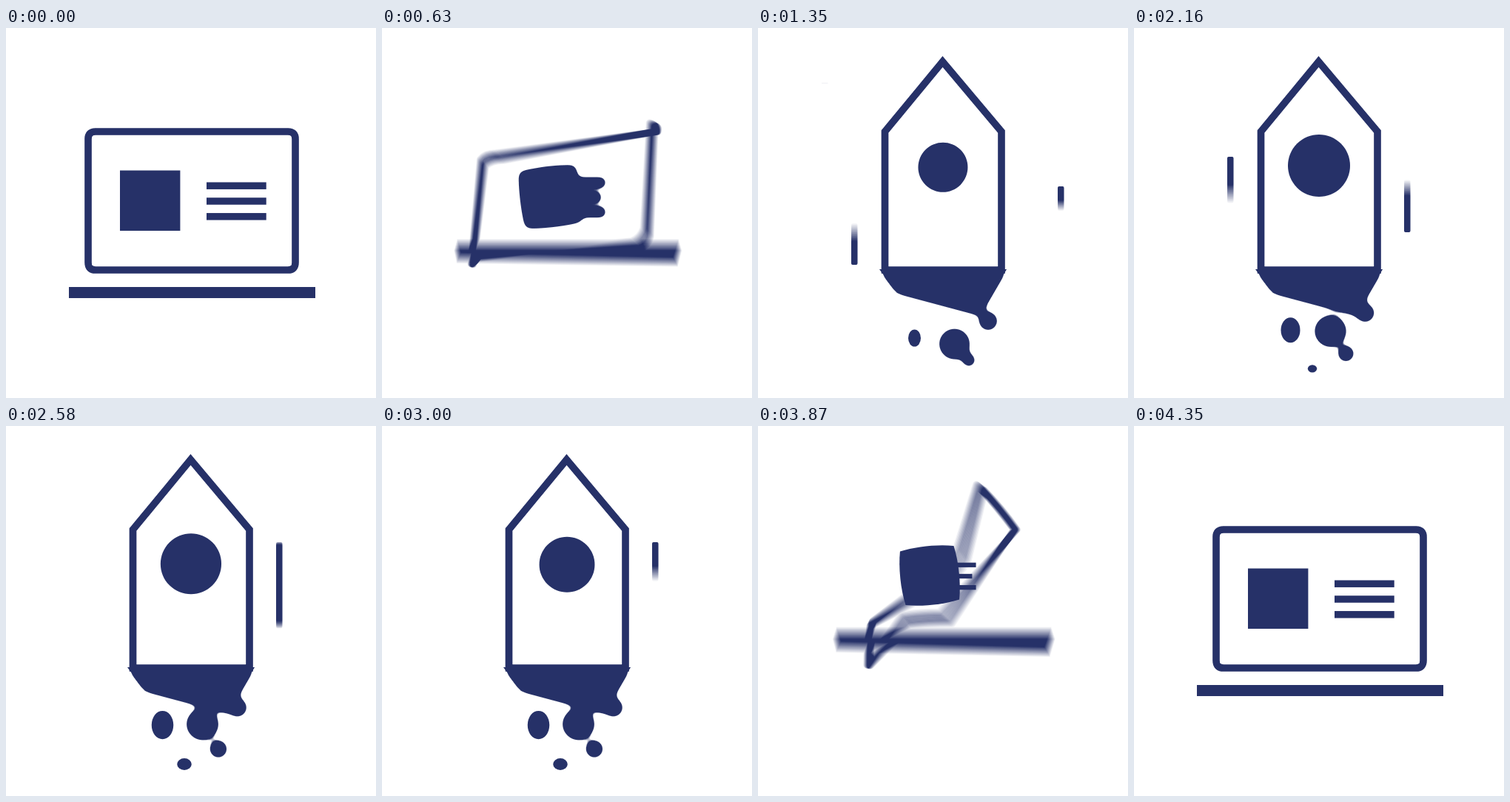
An HTML page with a canvas for the animation above (4770 ms loop, 500 px wide and 500 px high).

```html
<!DOCTYPE html>
<html lang="en">
<head>
<meta charset="utf-8">
<title>Laptop to rocket</title>
<style>
  html, body { margin: 0; width: 100%; height: 100%; overflow: hidden; background: #fff; }
  canvas { display: block; width: 100vw; height: 100vh; }
</style>
</head>
<body>
<canvas id="stage" width="500" height="500"></canvas>
<script>
const LOOP = 4770, STEP = 30, SHUTTER = 24, SAMPLES = 15;
const INK = '#263168', SIZE = 500, TAU = Math.PI * 2;

const layer = opts => {
  const c = document.createElement('canvas');
  c.width = c.height = SIZE;
  return c.getContext('2d', opts);
};
const view = document.getElementById('stage').getContext('2d');
const sample = layer(), blurred = layer();
const raw = layer(), soft = layer({ willReadFrequently: true });

const clamp = v => Math.min(1, Math.max(0, v));
const lerp = (a, b, k) => a + (b - a) * k;
const mix = (a, b, k) => [lerp(a[0], b[0], k), lerp(a[1], b[1], k)];
const smooth = x => { x = clamp(x); return x * x * (3 - 2 * x); };
const cubic = x => { x = clamp(x); return x < .5 ? 4 * x ** 3 : 1 - 4 * (1 - x) ** 3; };

// 0 = laptop, 1 = rocket
const stateAt = (t, inAt, inDur, outAt, outDur) =>
  cubic((t - inAt) / inDur) - cubic((t - outAt) / outDur);
const screenState = t => stateAt(t, 402, 640, 3583, 640);
const baseState = t => stateAt(t, 402, 640, 3477, 640);
const iconX = t => stateAt(t, 390, 450, 3610, 600);
const iconY = t => stateAt(t, 460, 560, 3610, 600);

// Corner pairs of the screen, each with the rocket point it travels to
const screen = [
  { at: [111, 140], a: [111, 150], b: [121, 140], toA: [250, 327], toB: [329, 327] },
  { at: [391, 140], a: [381, 140], b: [391, 150], toA: [329, 140], toB: [249.5, 45.5] },
  { at: [391, 327], a: [391, 317], b: [381, 327], toA: [210.5, 92.7], toB: [171.5, 140] },
  { at: [111, 327], a: [121, 327], b: [111, 317], toA: [171.5, 233], toB: [171.5, 327] }
];

function drawScreen(c, p) {
  c.beginPath();
  screen.forEach((s, i) => {
    const a = mix(s.a, s.toA, p), b = mix(s.b, s.toB, p);
    const ctrl = mix(s.at, mix(s.toA, s.toB, .5), p);
    i ? c.lineTo(...a) : c.moveTo(...a);
    if (p > .999) c.lineTo(...b);
    else c.quadraticCurveTo(...ctrl, ...b);
  });
  c.closePath();
  c.lineWidth = 9.6;
  c.lineJoin = p > .97 ? 'miter' : 'round';
  c.stroke();
}

const slab = [[85, 350], [418, 350], [418, 365], [85, 365]];
const nozzle = [[164, 326], [336, 326], [300, 388], [188, 358]];

function drawBase(c, p) {
  const lift = 98 * Math.sin(Math.PI * p);
  c.beginPath();
  slab.forEach((v, i) => {
    const [x, y] = mix(v, nozzle[i], p);
    c.lineTo(x, y - lift);
  });
  c.fill();
}

const streaks = [
  { x: 90, top: 74, bottom: 200, start: 5, every: 450, life: 280 },
  { x: 130, top: 174, bottom: 320, start: 42, every: 510, life: 360 },
  { x: 369, top: 157, bottom: 276, start: 370, every: 510, life: 360 },
  { x: 409, top: 214, bottom: 300, start: 378, every: 450, life: 360 }
];

function drawStreaks(c, t) {
  for (const s of streaks) {
    const local = (t - s.start + s.every * 4) % s.every;
    const born = t - local, u = local / s.life;
    if (u >= 1 || born < 930 || born + s.life > 3620) continue;
    const y0 = lerp(s.top, s.bottom, smooth((u - .45) / .55));
    const y1 = lerp(s.top, s.bottom, smooth(u / .55));
    c.beginPath();
    c.roundRect(s.x - 4, y0, 8.5, Math.max(0, y1 - y0), 2);
    c.fill();
  }
}

function ellipse(c, x, y, rx, ry = rx) {
  c.beginPath();
  c.ellipse(x, y, Math.max(0, rx), Math.max(0, ry), 0, 0, TAU);
  c.fill();
}

// Blur, then sharpen the alpha edge so that near shapes melt together
function goo(draw, sigma, x, y, w, h) {
  raw.clearRect(0, 0, SIZE, SIZE);
  draw(raw);
  soft.clearRect(0, 0, SIZE, SIZE);
  soft.filter = `blur(${sigma}px)`;
  soft.drawImage(raw.canvas, 0, 0);
  soft.filter = 'none';
  const img = soft.getImageData(x, y, w, h), d = img.data;
  for (let i = 3; i < d.length; i += 4) d[i] = (d[i] - 107) * 2.4 * sigma + 128;
  soft.putImageData(img, x, y);
  view.drawImage(soft.canvas, x, y, w, h, x, y, w, h);
}

// Square whose sides bulge until it is a circle
function drawBadge(c, t, qx, qy) {
  const live = smooth((t - 900) / 150) * (1 - smooth((t - 3450) / 150));
  const pulse = 36.5 + 5.6 * Math.cos(TAU * ((t - 1350) / 480 - .66));
  const r = lerp(38, pulse, live), m = qx ** 3;
  const half = lerp(40.7, r * Math.SQRT1_2, m);
  const hand = r * .5523 * Math.SQRT1_2;
  const out = hand * m, along = half - lerp(half * 2 / 3, hand, m);
  c.save();
  c.translate(lerp(194.7, 250, qx), lerp(233.2, 197.3 - .27 * r, qy));
  c.rotate(-.122 * Math.sin(Math.PI * qx));
  c.beginPath();
  c.moveTo(-half, -half);
  for (let i = 0; i < 4; i++) {
    const a = i * Math.PI / 2, cos = Math.cos(a), sin = Math.sin(a);
    const turn = (x, y) => [x * cos - y * sin, x * sin + y * cos];
    c.bezierCurveTo(...turn(-along, -half - out), ...turn(along, -half - out), ...turn(half, -half));
  }
  c.fill();
  c.restore();
}

function drawLines(c, qx, qy, swell) {
  if (qx > .97) return;
  const x0 = lerp(271, 240, qx), thick = 9.5 * (1 - .5 * qy) + swell;
  for (let i = -1; i <= 1; i++) {
    const x1 = lerp(351.7, 267, qx) - (i ? 0 : 6 * Math.sin(Math.PI * qx));
    const y = lerp(234, 188, qy) + i * 20.8 * (1 - .4 * qy);
    c.fillRect(x0, y - thick / 2, x1 - x0, thick);
  }
}

function drawIcon(t) {
  const qx = iconX(t), qy = iconY(t);
  const melt = t < 900 ? clamp((t - 390) / 180) : 0;
  const draw = c => {
    drawBadge(c, t, qx, qy);
    drawLines(c, qx, qy, 4 * melt);
  };
  if (melt > .1) goo(draw, 5 * melt, 130, 120, 250, 180);
  else draw(view);
}

function drawFlame(t) {
  const g = smooth((t - 930) / 240) * (1 - smooth((t - 3400) / 260));
  if (g <= 0) return;
  const q = .5 - .5 * Math.cos(TAU * (t - 1350) / 480);
  const blob = (c, x, y, rx, ry = rx) =>
    ellipse(c, lerp(255, x, g), lerp(345, y, g), rx * g, ry * g);
  goo(c => {
    drawBase(c, baseState(t));
    blob(c, lerp(311, 313, q), lerp(396, 380, q), 12);
    blob(c, 265.5, lerp(427, 402, q), lerp(20, 21, q));
    blob(c, lerp(285, 287, q), lerp(449, 436, q), lerp(8.5, 11.5, q));
  }, 6, 140, 290, 220, 205);
  blob(view, 211.5, lerp(419, 403.5, q), lerp(8.5, 15, q), lerp(11.5, 19.5, q));
  blob(view, 241, lerp(469, 456.5, q), lerp(-3, 10.3, q), lerp(-2, 8.3, q));
}

// Fast parts are averaged over a short shutter
function drawMoving(t) {
  blurred.clearRect(0, 0, SIZE, SIZE);
  blurred.globalCompositeOperation = 'lighter';
  blurred.globalAlpha = 1 / SAMPLES;
  for (let i = 0; i < SAMPLES; i++) {
    const s = t + SHUTTER * ((i + .5) / SAMPLES - .5);
    sample.clearRect(0, 0, SIZE, SIZE);
    drawScreen(sample, screenState(s));
    drawBase(sample, baseState(s));
    drawStreaks(sample, s);
    blurred.drawImage(sample.canvas, 0, 0);
  }
  blurred.globalAlpha = 1;
  view.drawImage(blurred.canvas, 0, 0);
}

function render(t) {
  view.globalCompositeOperation = 'source-over';
  view.clearRect(0, 0, SIZE, SIZE);
  view.fillStyle = '#000';
  drawMoving(t);
  drawFlame(t);
  drawIcon(t);
  view.globalCompositeOperation = 'source-in';
  view.fillStyle = INK;
  view.fillRect(0, 0, SIZE, SIZE);
}

const began = performance.now();
let shown = -1;
function tick() {
  const t = Math.floor((performance.now() - began) % LOOP / STEP) * STEP;
  if (t !== shown) render(shown = t);
  requestAnimationFrame(tick);
}
tick();
</script>
</body>
</html>
```
